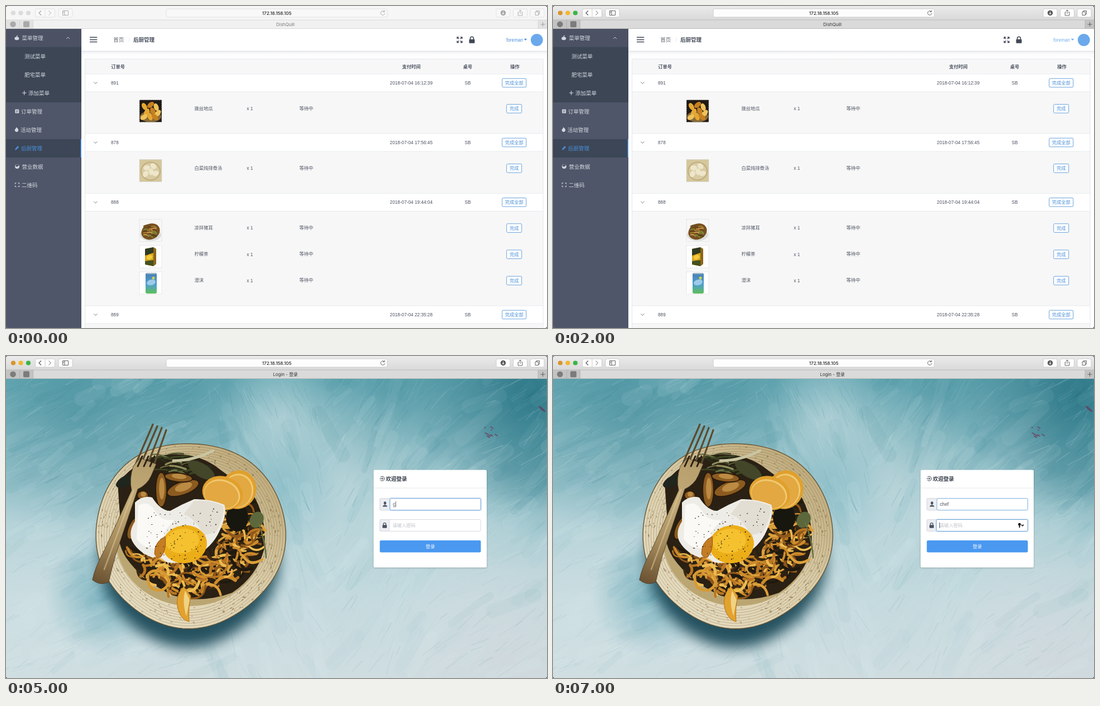
Animation of 969x578 px, one loop 8 s. Source, as an HTML page with a canvas:

```html
<!DOCTYPE html>
<html lang="zh">
<head>
<meta charset="utf-8">
<title>DishQuill</title>
<style>
html, body { margin: 0; width: 100%; height: 100%; overflow: hidden; background: #333; }
#stage { position: relative; width: 969px; height: 578px; overflow: hidden; border-radius: 4px; background: #fff; }
canvas, svg { position: absolute; left: 0; top: 0; display: block; }
text { font-family: Arial, "Liberation Sans", "Noto Sans CJK SC", "Noto Sans CJK", sans-serif; white-space: pre; }
.ui { font-family: Inter, "Noto Sans CJK SC", "Noto Sans CJK", sans-serif; }
</style>
</head>
<body>
<div id="stage">
  <canvas id="photo" width="969" height="578" data-on="4000,8000"></canvas>
  <svg id="ui" width="969" height="578" viewBox="0 0 969 578"></svg>
</div>
<script>
const LOOP = 8000;
const BLUE = '#4a90d9', INK = '#4c5361';

// SVG helpers
const rect = (x, y, w, h, fill, extra = '') =>
  `<rect x="${x}" y="${y}" width="${w}" height="${h}" fill="${fill}" ${extra}/>`;
const box = (x, y, w, h, fill, stroke, r = 2) => rect(x, y, w, h, fill, `stroke="${stroke}" rx="${r}"`);
const line = (d, stroke, w = 1, fill = 'none') =>
  `<path d="${d}" fill="${fill}" stroke="${stroke}" stroke-width="${w}"/>`;
const shape = (d, fill) => `<path d="${d}" fill="${fill}"/>`;
const dot = (x, y, r, fill) => `<circle cx="${x}" cy="${y}" r="${r}" fill="${fill}"/>`;
const oval = (x, y, rx, ry, fill, turn = 0) =>
  `<ellipse cx="${x}" cy="${y}" rx="${rx}" ry="${ry}" fill="${fill}" transform="rotate(${turn} ${x} ${y})"/>`;
const text = (s, x, cy, size = 8.24, fill = INK, extra = '') =>
  `<text x="${x}" y="${cy + size * .37}" font-size="${size}" fill="${fill}" ${extra}>${s}</text>`;
const mid = (s, x, cy, size, fill, extra = '') => text(s, x, cy, size, fill, 'text-anchor="middle" ' + extra);
const during = (from, to, body) => `<g data-on="${from},${to}">${body}</g>`;
const BOLD = 'font-weight="700"';

const lock = (x, y, s, fill) => `<g transform="translate(${x} ${y}) scale(${s})">` +
  rect(-5, -1, 10, 7, fill, 'rx="1"') + line('M-3 0V-2.5a3 3 0 0 1 6 0V0', fill, 1.6) + '</g>';

function browser(active) {
  const edge = active ? '#cdcdcd' : '#e2e2e2', ink = active ? '#555' : '#a4a4a4';
  const field = active ? '#fdfdfd' : '#f8f8f8';
  const lights = active ? ['#d9952e', '#f2b72f', '#3bb544'] : ['#dcdcdc', '#dcdcdc', '#dcdcdc'];
  const tab = active ? '#c3c3c3' : '#e2e2e2';
  let s = rect(0, 0, 969, 25, active ? 'url(#bar)' : '#f6f6f6') +
    rect(0, 25, 969, 16, active ? '#dadada' : '#f1f1f1') +
    rect(0, 25, 48.5, 16, tab) + rect(953, 25, 16, 16, tab) +
    line('M0 25H969M0 40.5H969', active ? '#b4b4b4' : '#d4d4d4', .8) +
    line('M24.5 25V41M48.5 25V41M953 25V41', active ? '#aaa' : '#d0d0d0', .7);
  lights.forEach((c, i) => s += dot(13 + 13.5 * i, 12.5, 4.1, c));
  for (const [x, w] of [[52.5, 35], [94, 25], [287, 396], [878, 25], [908.5, 25], [939, 25]])
    s += box(x, 5, w, 15, field, edge, 2.5);
  s += line('M70 5V20', edge) + line('M63 8.5L59 12.5L63 16.5', ink, 1.1) +
    line('M76.5 8.5L80.5 12.5L76.5 16.5', active ? '#a5a5a5' : '#ccc', 1.1) +
    line('M101.5 8.5H111.5V16.5H101.5ZM105 8.5V16.5M102.5 10.5H104M102.5 12.5H104', ink, .9) +
    line('M677.5 10A3.7 3.7 0 1 0 678.5 13M678 7.5V10.5H675', ink, .9) +
    dot(890.5, 12.5, 4.7, ink) + line('M890.5 9.7V15M888.3 12.8L890.5 15L892.7 12.8', '#fff', 1) +
    line('M919 11H917.2V17H924.8V11H923M921 14V7.2M919 9L921 7L923 9', ink, .9) +
    line('M948 10.5H953.5V16.5H948ZM950 10.5V8.5H955.5V14.5H953.5', ink, .9) +
    line('M957.5 33H965.5M961.5 29V37', active ? '#555' : '#999', .9) +
    dot(12.5, 32.7, 5.3, active ? '#7c7c7c' : '#aaa') + rect(31, 27.3, 11, 11, active ? '#7c7c7c' : '#aaa', 'rx="2"') +
    mid('172.18.158.105', 485, 12.7, 8, '#222', 'class="ui" font-weight="500"');
  return s;
}

function sidebar() {
  const c = '#d3d7df';
  let s = rect(0, 41, 135, 537, '#505669') + rect(0, 41, 135, 32.5, '#4c5264') +
    rect(0, 73.5, 135, 99.5, '#3c4655') + rect(0, 239, 135, 33, '#3c4656') + rect(133.6, 239, 1.4, 33, '#55a0ef');
  const items = [['菜单管理', 28.5, 57], ['测试菜单', 33, 90], ['肥宅菜单', 33, 123], ['添加菜单', 40, 156],
    ['订单管理', 27, 189], ['活动管理', 26, 222], ['后厨管理', 27, 255, BLUE], ['营业数据', 28.5, 288], ['二维码', 28, 321]];
  for (const [label, x, y, fill = c] of items) s += text(label, x, y, 9.5, fill);
  return s + oval(19.3, 58.2, 4, 3, c) + line('M19.3 56Q19 53.5 21 53', c, 1.2) +
    line('M108 59L111 56L114 59', c, .9) + line('M29 156H36.5M32.7 152.3V159.7', c, 1.2) +
    rect(16.3, 185.5, 7, 7, c, 'rx="1"') + line('M18 187.7H21.8M18 189.2H21.8M18 190.7H20.5', '#505669', .7) +
    shape('M18.5 217.5C22 220 22.5 222 22 224A3.3 3.3 0 0 1 15.7 223C15.7 221 18 220.5 18.5 217.5Z', c) +
    shape('M15.8 259L17 255.7L21 251.3L23.3 253.2L19 257.6Z', BLUE) +
    dot(20, 288, 3.9, c) + shape('M16.9 287.5L20 288.7L23.2 286A3.3 3.3 0 0 0 16.9 287.5', '#505669') +
    line('M18.5 317.7H16.4V319.8M21.5 317.7H23.6V319.8M16.4 322.2V324.3H18.5M23.6 322.2V324.3H21.5', c, 1.1);
}

function header() {
  const dark = '#414855';
  return line('M150 56.2H163.3M150 60.4H163.3M150 64.6H163.3', dark, 1.5) +
    text('首页', 192.3, 60.5, 9.5, '#5c6370') + text('/', 219.5, 60.5, 9, '#d9dce2') +
    text('后厨管理', 228, 60.5, 9.5, '#434a58', BOLD) +
    line('M808 59V56H811M814 56H817V59M817 62.5V65.5H814M811 65.5H808V62.5M808 56L811.3 59.3M817 56L813.7 59.3M808 65.5L811.3 62.2M817 65.5L813.7 62.2', dark, 1.3) +
    lock(834.5, 60.7, 1, dark) + dot(950.8, 61, 10.9, '#6ba9ec') +
    [[0, 2000, BLUE], [2000, 3000, '#72b0ec'], [3000, 4000, BLUE]].map(([a, b, c]) =>
      during(a, b, text('foreman', 926.2, 61, 8.24, c, 'text-anchor="end"') + shape('M927.6 58.7H933.4L930.5 62Z', c))).join('');
}

// Dish thumbnails, drawn in a 40 by 40 cell
const leafy = ['#6d491c', '#b98434', '#7f8c39', '#d0a052', '#4d3a1b'];
const dishes = {
  yam: rect(0, 0, 40, 40, '#211b15') + oval(20, 30, 19, 10, '#8a6a37') +
    [[9, 12, 60], [20, 9, -40], [30, 13, 70], [13, 22, -60], [24, 20, 60], [33, 24, -50], [19, 30, 70], [28, 31, 40], [8, 31, -30]]
      .map(([x, y, a], i) => oval(x, y, 7, 4.2, ['#e5a832', '#c78021', '#efc25a'][i % 3], a)).join(''),
  soup: rect(0, 0, 40, 40, '#d5c79d') + oval(20, 21, 18, 17, '#c1ae7c') + oval(20, 21, 16, 15, '#d8cba4') +
    [[13, 15], [25, 12], [21, 22], [11, 26], [29, 25]].map(([x, y], i) => oval(x, y, 6, 4.6, '#eee6ca', i * 40)).join(''),
  ear: rect(0, 0, 40, 40, '#f7f7f5') + oval(20, 28, 19, 11, '#dcdedb') + oval(20, 22, 17, 14, '#765020', -25) +
    Array.from({ length: 18 }, (_, i) => line(`M${7 + i * 7 % 21} ${13 + i * 5 % 18}q6 ${i % 5 - 5} 10 ${i % 4}`, leafy[i % 5], 1.8)).join(''),
  tea: rect(0, 0, 40, 40, '#fff') + shape('M10 6L25 3L30 6V33L25 37L10 34Z', '#d9a51f') +
    shape('M25 3L30 6V33L25 37Z', '#8a671b') + shape('M10 6L25 3V13L10 18Z', '#2e3a22') +
    oval(18, 21, 5.5, 4, '#f2cb3b', -20) + shape('M10 28L25 26V37L10 34Z', '#45511f'),
  can: rect(0, 0, 40, 40, '#fff') + rect(11, 2, 20, 37, 'url(#can)', 'rx="3"') + rect(13, 2, 16, 2, '#aebfc9') +
    oval(21, 19, 8, 5, '#9ccbe8', -15) + dot(25, 11, 2.5, '#d8d443')
};

const orders = [
  [138, '891', '2018-07-04 16:12:39', [['拨丝地瓜', 'yam']], 229],
  [245, '878', '2018-07-04 17:56:45', [['白菜炖排骨汤', 'soup']], 336],
  [352.3, '888', '2018-07-04 19:44:04', [['凉拌猪耳', 'ear'], ['柠檬茶', 'tea'], ['澄沫', 'can']], 538],
  [554, '889', '2018-07-04 22:35:28', [], 600]
];
const button = (label, cy, w) =>
  box(910.2 - w / 2, cy - 7.8, w, 15.6, '#fff', '#6aa3dd', 1.8) + mid(label, 910.2, cy, 8.24, BLUE);

function table() {
  let s = rect(141.5, 95, 820.5, 27, '#f7f7f8') + text('订单号', 188.3, 108.5, 8.24, INK, BOLD) +
    mid('支付时间', 726, 108.5, 8.24, INK, BOLD) + mid('桌号', 827, 108.5, 8.24, INK, BOLD) +
    mid('操作', 911.5, 108.5, 8.24, INK, BOLD);
  for (const [y, id, time, list, end] of orders) {
    const top = y + 16;
    s += rect(141.5, top, 820.5, end - top, '#f7f7f7') +
      line(`M141.5 ${y - 16}H962M141.5 ${top}H962`, '#e6e8ec', .9) +
      line(`M157.3 ${y - 1.5}L160.4 ${y + 1.5}L163.5 ${y - 1.5}`, '#656c78', .9) +
      text(id, 188, y) + mid(time, 725.8, y) + mid('SB', 827, y) + button('完成全部', y, 43);
    list.forEach(([name, art], i) => {
      const cy = y + 46 + i * 47.2;
      s += `<g transform="translate(239 ${cy - 15.5})">${dishes[art]}` +
        rect(0, 0, 40, 40, 'none', 'stroke="#cfd2d8" stroke-width=".8" stroke-dasharray="2 1.5"') + '</g>' +
        text(name, 337.5, cy - .3) + text('x 1', 431.3, cy) + text('等待中', 525.5, cy - .3) + button('完成', cy + .3, 27);
    });
  }
  return s + line('M141.5 578V95H962V578', '#e2e4e9', .9);
}

const menu = rect(868.5, 70.5, 67.7, 56, '#fff', 'rx="2" filter="url(#soft)"') +
  rect(868.5, 102, 67.7, 21, '#f3f3f3') + line('M868.5 98H936.2', '#e6e8ec', .9) +
  text('修改密码', 879, 84.5) + text('退出登录', 879, 112.5);

const kitchen = rect(135, 41, 834, 537, '#fff') + rect(135, 81, 834, 14, 'url(#fade)') +
  line('M135 81.2H969', '#dcdee2', 1) + header() + table() + sidebar();

const focus = (x, y) => rect(x - 1, y - 1, 852.3 - x, 23, 'none', 'rx="3" stroke="#d5e6f7" stroke-width="1.2"') +
  box(x, y, 850.3 - x, 21, '#fff', '#6fa6da');
const caret = (x, y) => line(`M${x} ${y - 5}V${y + 5}`, '#333', .8);

function login() {
  const grey = '#bfc3ca', edge = '#d7dae0', dark = '#4a5060';
  return rect(658.5, 204.5, 202.5, 175, '#fff', 'rx="2.5" filter="url(#soft)"') +
    line('M658.5 237H861', '#e4e6ea', .9) +
    line('M670.7 217.5A4 4 0 1 1 670.7 222.7M669.3 220.1H675.3M673.3 218L675.4 220.1L673.3 222.2', '#3a404c', 1) +
    text('欢迎登录', 680.2, 220.5, 9.5, '#333a47', BOLD) +
    box(669.7, 255.7, 180.6, 21, '#fff', edge) + box(669.7, 255.7, 18, 21, '#eceef2', edge) +
    box(669.7, 293.5, 180.6, 21, '#fff', edge) + box(669.7, 293.5, 17, 21, '#eceef2', edge) +
    oval(678.8, 264, 2.2, 2.8, dark) + shape('M674.6 270.5Q674.8 268 677.5 267.5H680Q682.8 268 683 270.5Z', dark) +
    lock(678.2, 304, .78, dark) +
    rect(669.5, 331, 181, 21.5, '#4a98f0', 'rx="2.3"') + mid('登录', 760, 341.8, 8.24, '#fff') +
    during(4000, 5000, text('请输入用户名', 693, 266.2, 8.24, grey) + rect(0, 40.2, 969, 1.6, '#5293c9')) +
    during(5000, 6000, focus(687.7, 255.7) + text('c', 693, 266.2) + line('M693 270.7H697.5', '#555', .7) + caret(698, 266)) +
    during(6000, 7000, focus(687.7, 255.7) + text('chef', 693, 266.2) + caret(709.2, 266)) +
    during(7000, 8000, box(687.7, 255.7, 162.6, 21, '#fff', '#7fb3de') + text('chef', 693, 266.2) +
      focus(686.7, 293.5) + caret(692.5, 304) + dot(835.5, 302.2, 2.4, '#111') + rect(834.6, 303, 1.9, 5, '#111') +
      line('M838.8 302.8L841 305L843.2 302.8', '#111', 1.4)) +
    text('请输入密码', 692.3, 304, 8.24, grey);
}

const stops = (...list) => list.map(([o, c]) => `<stop offset="${o}" stop-color="${c}"/>`).join('');
const grad = (id, s) => `<linearGradient id="${id}" x2="0" y2="1">${s}</linearGradient>`;
const tabTitle = (s, fill) => mid(s, 500.5, 33, 7.9, fill, 'class="ui"');

document.getElementById('ui').innerHTML = '<defs>' +
  grad('bar', stops([0, '#ebebeb'], [1, '#d9d9d9'])) + grad('can', stops([0, '#477fb5'], [.55, '#4f9fd0'], [1, '#5fbf57'])) +
  grad('fade', stops([0, '#eceef1'], [.35, '#fbfbfc'], [1, '#fff'])) +
  '<filter id="soft" x="-20%" y="-20%" width="140%" height="140%"><feDropShadow dx="0" dy="1" stdDeviation="1.8" flood-opacity=".25"/></filter></defs>' +
  during(0, 4000, kitchen) + during(3000, 4000, menu) +
  during(0, 1000, browser(false) + tabTitle('DishQuill', '#777')) +
  during(1000, 8000, browser(true)) + during(1000, 4000, tabTitle('DishQuill', '#333')) +
  during(4000, 8000, tabTitle('Login - 登录', '#333') + login());

// Painted still life behind the login card
function paintPhoto() {
  const g = document.getElementById('photo').getContext('2d');
  let seed = 17;
  const rnd = (a = 0, b = 1) => {
    seed = (seed * 16807) % 2147483647;
    return a + (b - a) * seed / 2147483647;
  };
  const pick = list => list[Math.floor(rnd(0, list.length))];
  const path = (d, fill, stroke, w = 1) => {
    const p = new Path2D(d);
    if (fill) { g.fillStyle = fill; g.fill(p); }
    if (stroke) { g.strokeStyle = stroke; g.lineWidth = w; g.stroke(p); }
  };
  const disc = (x, y, rx, ry, fill, turn = 0) => {
    g.beginPath();
    g.ellipse(x, y, rx, ry, turn, 0, 7);
    g.fillStyle = fill;
    g.fill();
  };
  const glow = (x, y, r, rgb, a) => {
    const f = g.createRadialGradient(x, y, 0, x, y, r);
    f.addColorStop(0, `rgba(${rgb},${a})`);
    f.addColorStop(1, `rgba(${rgb},0)`);
    g.fillStyle = f;
    g.fillRect(0, 0, 969, 578);
  };
  const blend = (...colors) => (x0, y0, x1, y1) => {
    const f = g.createLinearGradient(x0, y0, x1, y1);
    colors.forEach((c, i) => f.addColorStop(i / (colors.length - 1), c));
    return f;
  };
  g.lineCap = 'round';

  g.fillStyle = blend('#6babb6', '#92c0c8', '#b0d0d6', '#c5dade', '#cfdde0')(0, 40, 0, 578);
  g.fillRect(0, 0, 969, 578);
  const teal = '42,122,138', pale = '209,225,228';
  glow(940, 70, 210, '22,100,118', .75);
  glow(130, 100, 230, teal, .45);
  glow(330, 70, 140, teal, .3);
  glow(690, 60, 180, teal, .3);
  glow(950, 200, 130, teal, .4);
  glow(490, 110, 110, pale, .5);
  glow(590, 240, 190, pale, .5);
  glow(800, 470, 170, pale, .4);
  glow(40, 470, 240, pale, .6);
  glow(180, 430, 110, '50,140,160', .5);
  glow(900, 540, 220, '208,214,219', .6);
  glow(500, 240, 110, '80,160,178', .3);

  // broad dabs first, then fine bristle marks, along a slowly turning direction
  const brush = (count, minLen, maxLen, minW, maxW, alpha) => {
    for (let i = 0; i < count; i++) {
      const x = rnd(-20, 969), y = rnd(35, 578), len = rnd(minLen, maxLen);
      const turn = x < 360 ? -.5 : x < 560 ? 1.2 : -.8 + .3 * Math.sin(x / 60);
      const a = turn + rnd(-.25, .25), fade = y < 280 ? 1 : .5;
      g.strokeStyle = rnd() < .55 ? `rgba(222,236,238,${rnd(.3, 1) * alpha})` : `rgba(42,122,138,${rnd(.3, 1) * alpha * fade})`;
      g.lineWidth = rnd(minW, maxW);
      g.beginPath();
      g.moveTo(x, y);
      g.lineTo(x + len * Math.cos(a), y + len * Math.sin(a));
      g.stroke();
    }
  };
  brush(260, 30, 90, 8, 26, .09);
  brush(1800, 10, 50, .4, 1.5, .2);
  for (let i = 0; i < 9; i++) disc(rnd(855, 880), rnd(128, 150), rnd(1, 4), 1, '#6b4d68', .6);
  disc(960, 95, 8, 2, '#5b4c69', .7);

  // plate
  const rim = k => {
    g.beginPath();
    for (let a = 0; a < 6.29; a += .05) {
      const r = k * (1 + .012 * Math.cos(3 * a + 1) + .008 * Math.sin(5 * a));
      g.lineTo(330 + 170 * r * Math.cos(a), 320.5 + 166 * r * Math.sin(a));
    }
    g.closePath();
  };
  g.save();
  g.shadowColor = 'rgba(28,74,88,.95)';
  g.shadowBlur = 24;
  g.shadowOffsetX = -2;
  g.shadowOffsetY = 44;
  rim(.94);
  g.fillStyle = '#cfc09a';
  g.fill();
  g.restore();
  rim(1);
  g.fillStyle = blend('#e6dcc0', '#dccfac', '#bfab7c')(220, 460, 430, 180);
  g.fill();
  g.strokeStyle = '#665535';
  g.lineWidth = 1.4;
  g.stroke();
  for (let k = .97; k > .78; k -= .028) {
    rim(k);
    g.strokeStyle = 'rgba(105,84,45,.4)';
    g.lineWidth = .8;
    g.stroke();
  }
  for (let i = 0; i < 350; i++) {
    const a = rnd(0, 6.28), r = rnd(.78, .98);
    disc(330 + 170 * r * Math.cos(a), 320 + 166 * r * Math.sin(a), rnd(.5, 2.5), .6, 'rgba(96,76,42,.6)', a + 1.57);
  }
  disc(330, 325, 134, 124, '#bba672');

  // noodles and greens
  path('M200 228Q240 180 290 177Q345 172 385 205L440 245Q467 285 463 345Q450 395 405 425Q350 445 300 430Q245 405 215 362Q195 330 205 300Z', '#2a2013');
  const noodle = ['#dba03a', '#b87623', '#ecbc52', '#8f571b', '#cd8b2b', '#3a2813', '#1f190f'];
  for (let i = 0; i < 270; i++) {
    const a = rnd(-.7, 2.9), r = Math.sqrt(rnd(.2, 1));
    const x = 332 + 120 * r * Math.cos(a), y = 316 + 110 * r * Math.sin(a);
    const dx = rnd(-19, 19), dy = rnd(-12, 12);
    path(`M${x - dx} ${y - dy}Q${x + dy} ${y - dx} ${x + dx} ${y + dy}`, null, pick(noodle), rnd(2.5, 5.5));
  }
  path('M254 393Q262 380 283 390Q302 407 280 420Q252 424 254 393', null, '#d79a33', 5);
  const green = ['#3b4523', '#697044', '#28301d', '#8b8d5b'];
  for (let i = 0; i < 24; i++) {
    const x = rnd(245, 345), y = rnd(177, 212);
    path(`M${x} ${y}q12 ${rnd(-8, 0)} 28 ${rnd(-4, 12)}`, null, pick(green), rnd(1.5, 4));
  }
  disc(215, 224, 20, 9, '#20251d', -.5);
  disc(350, 205, 27, 12, '#434629', .55);
  path('M300 188Q335 188 371 170', null, '#c9c5a2', 5);
  disc(449, 294, 12, 15, '#5c683c', .5);
  path('M452 300Q464 330 466 362', null, '#657143', 2.5);
  disc(414, 290, 20, 25, '#17160f');

  // mushrooms
  for (const [x, y, rx, ry, t] of [[278, 240, 9, 30, 0], [317, 237, 29, 11, -.35], [309, 218, 24, 7, .1], [230, 308, 9, 22, .45], [245, 250, 9, 7, 0]]) {
    disc(x, y, rx + 2, ry + 2, '#2b1b0c', t);
    disc(x, y, rx, ry, '#8b5b20', t);
    disc(x + 1, y - 2, rx * .55, ry * .65, '#bb8a43', t);
  }

  // lemon slices
  for (const [x, y, rx, ry] of [[416, 240, 32, 35], [388, 246, 37, 30]]) {
    disc(x, y, rx, ry, '#e0a02c', .3);
    disc(x - 1, y + 2, rx - 4, ry - 4, '#f0c870', .3);
    disc(x - 2, y + 3, rx - 6, ry - 6, '#e3a841', .3);
  }
  path('M318 414Q302 430 308 454Q314 474 328 477Q326 452 331 431Z', '#e2a22e', '#b87517', 1);
  path('M321 421Q315 440 323 467L329 438Z', '#f0d283');

  // egg
  path('M231 263Q245 249 262 254Q276 277 294 278Q315 266 337 257Q365 256 391 267Q397 284 382 315Q370 342 340 359Q313 376 288 370Q271 357 263 362Q239 354 227 334Q218 318 231 297Z', '#eeece6');
  path('M337 260Q365 258 389 269Q392 288 376 316L355 322Q338 290 318 284Z', '#e2ded4');
  path('M237 268Q255 258 267 278Q278 298 302 294Q276 319 281 343Q248 350 234 328Z', '#faf9f6');
  disc(320, 338, 40, 34, '#ecae18', -.15);
  disc(316, 332, 30, 22, '#f5c12e', -.15);
  path('M285 324Q266 333 266 355Q270 364 277 361Q288 349 285 324', '#c47d24', '#8e551b', 1);
  for (let i = 0; i < 110; i++) disc(rnd(250, 388), rnd(270, 365), rnd(.4, 1.4), rnd(.4, 1.2), '#3d321f');

  // fork
  for (const [x, y, tx, ty] of [[231, 197, 263, 123], [241, 196, 271, 126], [252, 199, 279, 129], [262, 204, 287, 133]])
    path(`M${x} ${y}L${tx} ${ty}`, null, '#5d4a2c', 3.2);
  path('M155 402Q158 382 177 347L225 241Q220 221 228 198L240 183L269 194L260 215Q253 231 236 239L196 358Q187 391 184 406Q168 413 155 402Z',
    blend('#6d5434', '#a68b5c', '#c3ab79', '#b89f6e', '#65543a')(170, 405, 275, 130), '#4a3a20', .8);
  for (const x of [236, 247, 258]) path(`M${x} 198L${x + 8} 180`, null, '#2a2113', 3);
  path('M176 383L229 240', null, 'rgba(224,207,160,.5)', 2.5);
}
paintPhoto();

const timed = [...document.querySelectorAll('[data-on]')].map(el => [el, ...el.dataset.on.split(',').map(Number)]);
function frame() {
  const t = performance.now() % LOOP;
  for (const [el, from, to] of timed) el.style.display = t >= from && t < to ? '' : 'none';
  requestAnimationFrame(frame);
}
frame();
</script>
</body>
</html>
```
